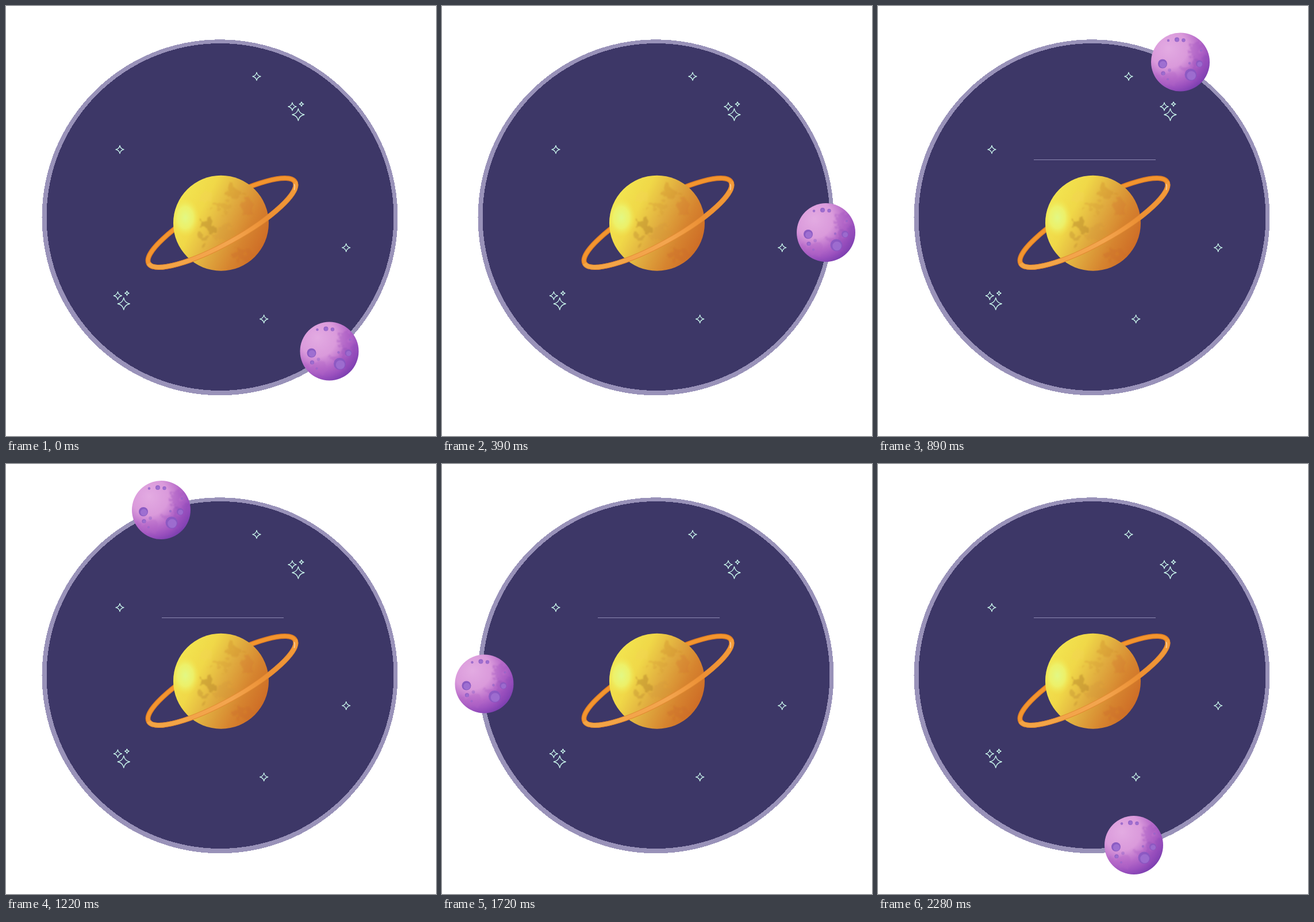
These frames come from a looping animation (748x748 px, 2.34 s). An HTML page:

```html
<!DOCTYPE html>
<html lang="en">
<head>
<meta charset="utf-8">
<title>Moon orbit</title>
<style>
  html, body { margin: 0; width: 100%; height: 100%; overflow: hidden; background: #fff; }
  svg { display: block; width: 100%; height: 100%; }
</style>
</head>
<body>
<svg viewBox="0 0 748 748">
  <defs>
    <linearGradient id="gold" x1="0" y1=".25" x2="1" y2=".75">
      <stop offset=".04" stop-color="#f2e550"/>
      <stop offset=".28" stop-color="#f0d848"/>
      <stop offset=".52" stop-color="#e0ab3f"/>
      <stop offset=".75" stop-color="#d6842f"/>
      <stop offset="1" stop-color="#cc6724"/>
    </linearGradient>
    <radialGradient id="glow">
      <stop offset="0" stop-color="#e2f884"/>
      <stop offset=".55" stop-color="#ecf570" stop-opacity=".8"/>
      <stop offset="1" stop-color="#f2e650" stop-opacity="0"/>
    </radialGradient>
    <linearGradient id="band">
      <stop offset="0" stop-color="#f3a444"/>
      <stop offset=".5" stop-color="#f3a54f"/>
      <stop offset=".75" stop-color="#ec8f33"/>
      <stop offset="1" stop-color="#f49c3a"/>
    </linearGradient>
    <radialGradient id="violet" cx=".3" cy=".27" r=".8">
      <stop offset="0" stop-color="#e3abe2"/>
      <stop offset=".4" stop-color="#da9adb"/>
      <stop offset=".65" stop-color="#b86cca"/>
      <stop offset=".85" stop-color="#9a50be"/>
      <stop offset="1" stop-color="#7c3fb0"/>
    </radialGradient>
    <filter id="rough" x="-30%" y="-30%" width="160%" height="160%">
      <feTurbulence type="fractalNoise" baseFrequency=".07" numOctaves="4" seed="4"/>
      <feDisplacementMap in="SourceGraphic" scale="32" xChannelSelector="R" yChannelSelector="G"/>
      <feGaussianBlur stdDeviation="1.3"/>
    </filter>
    <clipPath id="sunClip"><circle cx="374" cy="377.7" r="83"/></clipPath>
    <clipPath id="moonClip"><circle r="51"/></clipPath>
  </defs>

  <g shape-rendering="crispEdges">
    <circle cx="372" cy="367.8" r="309.5" fill="#9992b9"/>
    <circle cx="372.5" cy="367" r="302" fill="#3d3767"/>
  </g>
  <g id="stars" fill="none" stroke="#c9f6ec" stroke-width="1.3" stroke-linejoin="round"></g>
  <path id="line" d="M271 267.5H483" stroke="#8e89b3" stroke-width="1"/>

  <g transform="translate(375.5 377) rotate(-29.1)" fill="none">
    <ellipse rx="145.7" ry="35.8" stroke="#dd7d25" stroke-width="8.8"/>
    <ellipse rx="145.7" ry="35.8" stroke="#f3952f" stroke-width="6"/>
  </g>
  <circle cx="374" cy="377.7" r="83" fill="url(#gold)"/>
  <g clip-path="url(#sunClip)">
    <ellipse cx="312" cy="368" rx="25" ry="34" fill="url(#glow)"/>
    <g id="sunSpots" filter="url(#rough)"></g>
  </g>
  <g transform="translate(375.5 377) rotate(-29.1)" fill="none">
    <path d="M145.7 0A145.7 35.8 0 0 1 -145.7 0" stroke="#e18a32" stroke-width="8.8"/>
    <path d="M145.7 0A145.7 35.8 0 0 1 -145.7 0" stroke="url(#band)" stroke-width="6.8"/>
    <path d="M138 11A145.7 35.8 0 0 0 142.5 3" stroke="#f8d2a6" stroke-width="1.6" stroke-linecap="round"/>
  </g>

  <g id="moon">
    <circle r="51" fill="url(#violet)"/>
    <g clip-path="url(#moonClip)">
      <g id="moonSpots" filter="url(#rough)"></g>
      <g id="craters"></g>
    </g>
  </g>
</svg>
<script>
const LOOP = 2340, FPS = 18, LAST = 41, LINE_FROM = 9;
const CX = 371, CY = 369;
const $ = id => document.getElementById(id);

function add(parent, tag, attrs) {
  const el = document.createElementNS('http://www.w3.org/2000/svg', tag);
  for (const key in attrs) el.setAttribute(key, attrs[key]);
  return parent.appendChild(el);
}

// Four-pointed outlined stars
function star(x, y, r) {
  const c = r * 0.16;
  add($('stars'), 'path', {
    transform: `translate(${x} ${y})`,
    d: `M0 ${-r}Q${c} ${-c} ${r} 0Q${c} ${c} 0 ${r}Q${-c} ${c} ${-r} 0Q${-c} ${-c} 0 ${-r}Z`
  });
}
function cluster(x, y) {
  star(x, y, 7);
  star(x + 16, y - 4.3, 3.8);
  star(x + 10.4, y + 14, 10.5);
}
[[436, 122.5], [198, 249.7], [591.7, 420.3], [448.7, 544.5]].forEach(([x, y]) => star(x, y, 7));
cluster(498, 175);
cluster(194.4, 504);

// Soft ragged patches: x, y, rx, ry, colour, opacity
function patches(id, list) {
  for (const [cx, cy, rx, ry, fill, opacity] of list)
    add($(id), 'ellipse', { cx, cy, rx, ry, fill, opacity });
}
patches('sunSpots', [
  [352, 380, 9, 14, '#b98a2c', .5],
  [344, 406, 7, 8, '#bd8c2e', .4],
  [376, 350, 18, 7, '#d59a34', .35],
  [398, 324, 20, 8, '#cf8c30', .35],
  [380, 396, 20, 13, '#cf9436', .3],
  [420, 350, 10, 14, '#cf742a', .3],
  [414, 434, 20, 8, '#cb6c25', .35],
  [350, 330, 14, 9, '#f2d552', .4]
]);
patches('moonSpots', [
  [27, -17, 12, 18, '#a356c0', .4],
  [36, 10, 15, 22, '#8443b4', .3],
  [14, 14, 13, 7, '#a65ac4', .35],
  [-18, 30, 22, 8, '#b163c6', .35]
]);

// Craters: x, y, radius, opacity
for (const [cx, cy, r, opacity] of [
  [-31, 3, 8, .95], [-30, 19.5, 3.6, .85], [18, 22, 10.5, .85], [33, 3, 6, .75],
  [-6, -39, 4, .85], [5.5, -38, 3.2, .8], [-21, -37.5, 2.2, .75], [36, -20, 2, .5],
  [16, 2, 2.2, .5], [-19, 14, 3, .3], [-22, 30, 2, .4]
]) {
  add($('craters'), 'circle', { cx, cy, r, opacity, fill: '#8658c2' });
  add($('craters'), 'circle', { cx: cx + r * .1, cy: cy + r * .14, r: r * .74, opacity, fill: '#a070d2' });
}

// Orbit knots: step, x, y; turned into unwrapped angle and radius
let prev = -Math.PI;
const knots = [
  [0, 562.5, 600.5], [7, 668, 394], [10, 663, 275], [16, 526, 97.5], [18, 432, 70],
  [20, 338, 65], [22, 270, 80], [30, 69, 342], [31, 73.5, 382.5], [36, 214, 627],
  [40, 391, 673], [41, 445, 663]
].map(([k, x, y]) => {
  let a = Math.atan2(CY - y, x - CX);
  while (a < prev) a += 2 * Math.PI;
  prev = a;
  return [k, a, Math.hypot(x - CX, y - CY)];
});

function slope(i, c) {
  const p = knots[Math.max(i - 1, 0)], q = knots[Math.min(i + 1, knots.length - 1)];
  return (q[c] - p[c]) / (q[0] - p[0]);
}
function curve(k, c) {
  let i = 0;
  while (i < knots.length - 2 && k >= knots[i + 1][0]) i++;
  const p = knots[i], q = knots[i + 1], h = q[0] - p[0], u = (k - p[0]) / h, v = 1 - u;
  return p[c] * v * v * (1 + 2 * u) + q[c] * u * u * (3 - 2 * u)
    + h * (slope(i, c) * u * v * v - slope(i + 1, c) * u * u * v);
}

const startOf = k => Math.round(k * 100 / FPS) * 10;

function draw(t) {
  let k = LAST;
  while (k > 0 && startOf(k) > t) k--;
  const a = curve(k, 1), r = curve(k, 2);
  const x = CX + r * Math.cos(a), y = CY - r * Math.sin(a);
  $('moon').setAttribute('transform', `translate(${x.toFixed(2)} ${y.toFixed(2)})`);
  $('line').style.display = k < LINE_FROM ? 'none' : '';
}

const t0 = performance.now();
function tick() {
  draw((performance.now() - t0) % LOOP);
  requestAnimationFrame(tick);
}
tick();
</script>
</body>
</html>
```
